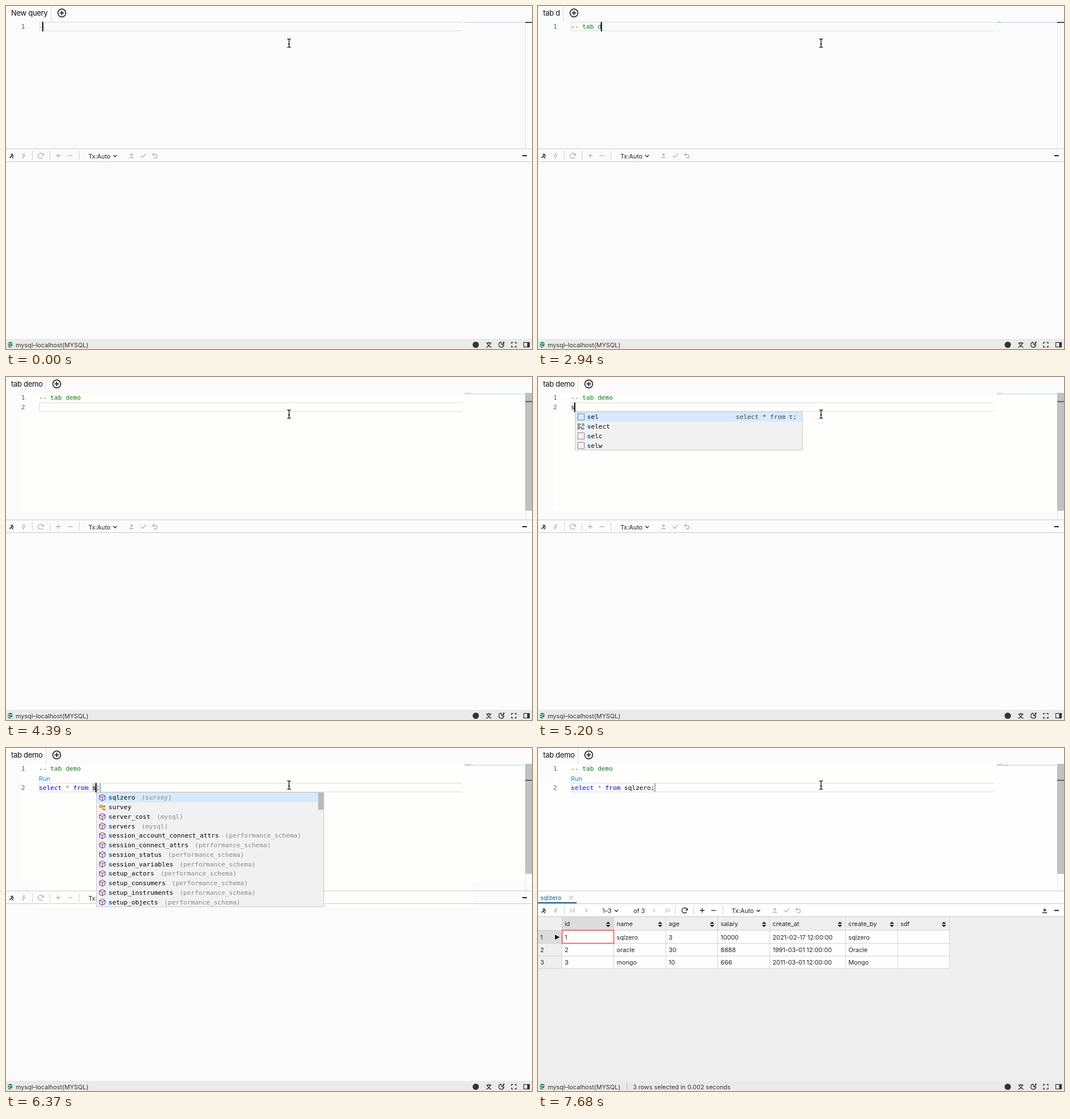
Write an HTML page that moves like this. It is 926 px wide and 605 px high and loops after 8000 ms.

```html
<!DOCTYPE html>
<html lang="en">
<head>
<meta charset="utf-8">
<title>Query editor</title>
<style>
  html, body { margin: 0; width: 100%; height: 100%; overflow: hidden; background: #fbfbfb; }
  svg { display: block; width: 926px; height: 605px; }
  text { font: 10.8px Inter, "Open Sans", sans-serif; fill: #222; white-space: pre; }
  .mono { font: 11.13px "DejaVu Sans Mono", "Liberation Mono", monospace; fill: #000; }
  .title { font-size: 13px; letter-spacing: -.3px; fill: #111; }
  .match { font-weight: bold; fill: #0062bd; }
  .icon { fill: none; stroke-width: 1.3; }
</style>
</head>
<body>
<svg id="stage" viewBox="0 0 926 605"></svg>
<script>
const LOOP = 8000, CH = 6.7, LEFT = 58, ROW = 16.75;
const DARK = '#222', PALE = '#b5b5b5', EDGE = '#cbcbcb';
const stage = document.getElementById('stage');

const snippets = [['sel', 'select * from t;'], ['select'], ['selc'], ['selw']];
const PS = 'performance_schema';
const tables = [
  ['sqlzero', 'survey'], ['survey'], ['server_cost', 'mysql'], ['servers', 'mysql'],
  ...['session_account_connect_attrs', 'session_connect_attrs', 'session_status',
    'session_variables', 'setup_actors', 'setup_consumers', 'setup_instruments',
    'setup_objects'].map(n => [n, PS])
];

// Each step changes part of the state: comment, line 2, caret column, popup, ...
const steps = [
  [0, { note: '-', sql: null, col: 1, caret: 1, lens: 0, paint: 0, list: null, match: 0, stop: 0, mark: 0, done: 0 }],
  [140, { note: '--', col: 2 }],
  [620, { note: '-- ', col: 3 }],
  [1010, { note: '-- t', col: 4 }],
  [1100, { note: '-- ta', col: 5 }],
  [1180, { note: '-- tab', col: 6 }],
  [1660, { caret: 0 }],
  [2020, { note: '-- tab ', col: 7, caret: 1 }],
  [2550, { caret: 0 }],
  [2940, { note: '-- tab d', col: 8, caret: 1 }],
  [3020, { note: '-- tab de', col: 9 }],
  [3110, { note: '-- tab dem', col: 10 }],
  [3290, { note: '-- tab demo', col: 11 }],
  [3770, { sql: '', col: 0 }],
  [3850, { paint: 1 }],
  [4390, { caret: 0 }],
  [4810, { caret: 1 }],
  [5140, { sql: 's', col: 1 }],
  [5200, { list: snippets, match: 1 }],
  [5430, { sql: 'se', col: 2, match: 2 }],
  [5510, { sql: 'sel', col: 3, match: 3 }],
  [5600, { lens: 1 }],
  [6020, { sql: 'select * from t;', col: 15, list: null, paint: 2, stop: 1, mark: 1 }],
  [6110, { list: tables, match: 0 }],
  [6370, { sql: 'select * from s;', match: 1 }],
  [6610, { sql: 'select * from sq;', col: 16, mark: 2, match: 2 }],
  [6700, { list: tables.slice(0, 1) }],
  [7150, { sql: 'select * from sqlzero;', col: 21, list: null, mark: 0 }],
  [7590, { caret: 0, paint: 3 }],
  [7680, { done: 1 }]
];
const states = [];
steps.forEach(([, change], i) => states.push({ ...states[i - 1], ...change }));

const rect = (x, y, w, h, fill, more = '') =>
  `<rect x="${x}" y="${y}" width="${w}" height="${h}" fill="${fill}" ${more}/>`;
const text = (x, y, s, fill = DARK, cls = '') =>
  `<text x="${x}" y="${y}" class="${cls}" style="fill:${fill}">${s}</text>`;
const mono = (x, y, s, fill = '#000') => text(x, y, s, fill, 'mono');
const span = (s, fill) => `<tspan fill="${fill}" style="fill:${fill}">${s}</tspan>`;
const icon = (x, y, d, color = DARK, more = '') =>
  `<path class="icon" transform="translate(${x} ${y})" d="${d}" stroke="${color}" ${more}/>`;

const glyph = {
  plus: 'M-4 0H4M0-4V4',
  minus: 'M-4 0H4',
  flash: 'M1-5L-3 1H0L-1 5L3-1H0Z',
  run: 'M-2-2L1-3L2 0L4 1M1-2L-1 1L2 3V5M-1 1L-2 3H-4',
  refresh: 'M4.5-1A4.6 4.6 0 1 0 3.6 3M5-4V-.6H1.6',
  chevron: 'M-3-1.5L0 1.5L3-1.5',
  check: 'M-4.5 0L-1.5 3L4.5-3.5',
  undo: 'M-1.5-4.5L-4-2L-1.5 .5M-4-2H1A3 3 0 0 1 1 4H-2',
  up: 'M0 2V-3M-2.5-1L0-3.5L2.5-1M-4 3.5H4',
  down: 'M0-4V1M-2.5-1.5L0 1L2.5-1.5M-4 4H4',
  prev: 'M1.5-3L-1.5 0L1.5 3',
  next: 'M-1.5-3L1.5 0L-1.5 3',
  first: 'M-4-3.5V3.5M3-3.5L-.5 0L3 3.5',
  last: 'M4-3.5V3.5M-3-3.5L.5 0L-3 3.5',
  close: 'M-3.5-3.5L3.5 3.5M3.5-3.5L-3.5 3.5',
  cube: 'M0-5.5L5-3V3L0 5.5L-5 3V-3ZM-5-3L0-.5L5-3M0-.5V5.5',
  tree: 'M-5-1L-2-4L0-2L-3 1ZM-1-1H3M1-1V4H3M3-3L5-1L4 0L2-2M3 3L5 4L4 5.5L2 4',
  keyword: 'M-6-4H0M2-4H6M-6-1.3H-2M2-1.3H6M-6 1.4H2M-6 4H-2M0 4H6',
  beam: 'M-3-7.5Q0-7.5 0-5.5Q0-7.5 3-7.5M0-5.5V5.5M-3 7.5Q0 7.5 0 5.5Q0 7.5 3 7.5M-1.5 1.5H1.5',
  lang: 'M-4.5-3H4.5M0-5V-3M-3-3Q-1 3 4.5 4.5M3-3Q1 3-4.5 4.5',
  moon: 'M0-4.5A4.5 4.5 0 1 0 4.5 1A4.2 4.2 0 0 1 0-4.5M2.5-4.5H5L2.5-1.5H5',
  full: 'M-4-1.5V-4H-1.5M1.5-4H4V-1.5M4 1.5V4H1.5M-1.5 4H-4V1.5'
};
const put = (name, x, y, color, more) => icon(x, y, glyph[name], color, more);
const dividers = (xs, y) => xs.map(x => rect(x, y - 8, 1, 16, '#d2d2d2')).join('');

function paint(s) {
  const tint = '#fefefd';
  let out = rect(0, 0, 926, 605, '#fbfbfb');
  if (s.paint) out += rect(27, 28, 899, 208, tint);
  if (s.paint > 1) out += rect(59, 62, 763, 218, tint);
  if (s.paint > 2) out += rect(0, 61, 926, 526, '#fefefe');
  return out;
}

function minimap(s) {
  const specks = (str, y, color) => [...str].map((c, i) =>
    c === ' ' ? '' : rect(808 + i * .93, y, .8, .9, color, 'opacity=".5"')).join('');
  const two = s.sql !== null;
  return rect(807, two ? 29.5 : 28, 107, 1.6, '#cfe4fa') +
    specks(s.note, 28.2, '#008000') + specks(s.sql || '', 30, '#3060a0');
}

function ruler(s) {
  let out = rect(914, 28, 1, 223, '#e4e4e4');
  if (s.paint) out += rect(914, 28, 12, s.lens ? 194 : 208, '#c1c1c1');
  const y = s.lens ? 56 : s.sql !== null ? 42.5 : 28;
  return out + rect(914, y, 12, 1.8, s.paint ? '#555' : '#333');
}

function editor(s) {
  const two = s.sql !== null;
  const top = !two ? 28 : s.lens ? 61.6 : 45;
  let out = `<path d="M803 ${top + .5}H58.5V${top + 15.7}H803" fill="none" stroke="#e3e3e3" stroke-width="1.3"/>`;
  out += mono(26.7, 40, '1', '#237893');
  out += mono(LEFT, 40, s.note, s.note.length > 1 ? '#008000' : '#777');
  if (two) {
    out += mono(26.7, top + 12, '2', '#237893');
    if (s.lens) out += text(LEFT, 58.4, 'Run', '#1482e6');
    if (s.mark) out += rect(LEFT + 14 * CH, top + 1, s.mark * CH, 15, '#ced6e0');
    const body = s.sql
      .replace(/select|from/g, w => span(w, '#0000ff'))
      .replace('*', span('*', '#777'));
    out += mono(LEFT, top + 12, body);
    if (s.stop) out += rect(LEFT + s.sql.length * CH, top + .5, 1, 16, '#48658c');
  }
  if (s.caret) out += rect(LEFT + s.col * CH - (s.col ? 1 : 0), top, 2, 16.7, '#000');
  return out + minimap(s) + ruler(s);
}

function popup(s) {
  if (!s.list) return '';
  const x = Math.round(LEFT + s.col * CH) + .5;
  const y = s.lens ? 79 : 62;
  const h = s.list.length * ROW;
  let out = rect(x, y, 400, h, '#f1f1f1') + rect(x, y, 400, ROW, '#d5eaff');
  s.list.forEach(([name, info], i) => {
    const mid = y + 8.5 + i * ROW, base = mid + 3.9;
    const left = x + 21, snip = s.list === snippets;
    if (snip && i !== 1) out += rect(x + 4.5, mid - 5.5, 11.5, 11, 'none', 'stroke="#555" stroke-dasharray="1.5 .7"');
    else if (snip) out += put('keyword', x + 10, mid, '#444');
    else if (i === 1) out += put('tree', x + 10, mid, '#d67e00');
    else out += put('cube', x + 10, mid, '#652d90', 'style="stroke-width:1"');
    const head = name.slice(0, s.match);
    out += mono(left, base, `<tspan class="match">${head}</tspan>${name.slice(s.match)}`);
    if (!info) return;
    if (snip) out += mono(x + 390 - info.length * CH, base, info, '#444');
    else out += mono(left + name.length * CH + 11, base, `(${info})`, '#8a8a8a');
  });
  if (s.list.length > 11) out += rect(x + 390, y, 10, 30, '#bababa');
  return out + rect(x, y - .5, 400, h + .5, 'none', 'stroke="#c8c8c8"');
}

// Transaction label with its commit and rollback buttons
const transaction = (x, y) => text(x, y + 4.5, 'Tx:Auto') + put('chevron', x + 47, y + .5) +
  put('up', x + 76, y, PALE) + put('check', x + 97, y, PALE) + put('undo', x + 117, y, PALE);
const runners = y => put('run', 10, y) + put('flash', 31, y, PALE, 'style="stroke-width:1"') +
  put('minus', 913, y, DARK, 'style="stroke-width:2"');

function plainBar() {
  const y = 264;
  return rect(0, 251.5, 926, 1, EDGE) + rect(0, 274, 926, 1, EDGE) + runners(y) +
    dividers([46, 77, 128], y) + put('refresh', 61, y, PALE) +
    put('plus', 92, y, PALE) + put('minus', 113, y, PALE) + transaction(145, y);
}

const edges = [42, 133.5, 225, 316.5, 408, 541.5, 633, 724.5];
const heads = ['id', 'name', 'age', 'salary', 'create_at', 'create_by', 'sdf'];
const rows = [
  ['1', 'sqlzero', '3', '10000', '2021-02-17 12:00:00', 'sqlzero', ''],
  ['2', 'oracle', '30', '8888', '1991-03-01 12:00:00', 'Oracle', ''],
  ['3', 'mongo', '10', '666', '2011-03-01 12:00:00', 'Mongo', '']
];

function results() {
  const y = 286.5, line = '#d3d3d3';
  let out = rect(0, 251.5, 926, 1, EDGE) + rect(0, 274, 926, 1, EDGE) +
    text(4, 268, 'sqlzero', '#0b6697') + put('close', 58, 264, '#aaa', 'style="stroke-width:1"') +
    rect(0, 272, 68, 2, '#0b6697') + runners(y) + dividers([46, 241, 273, 325], y) +
    put('first', 62, y, PALE) + put('prev', 85, y, PALE) + text(113, 291, '1–3') +
    put('chevron', 138, 287) + text(168, 290.5, 'of 3') + put('next', 204, y, PALE) +
    put('last', 227, y, PALE) + put('refresh', 258, y) + put('plus', 289, y) +
    put('minus', 309, y) + transaction(341, y) + put('down', 892, y);
  out += rect(0, 297, 926, 290, '#efefef') + rect(0, 297, 926, 1, EDGE);
  out += rect(42, 298, 91.5, 23, '#dcdcdc') + rect(0, 321.5, 42, 23, '#dcdcdc');
  out += rect(42, 321.5, 682.5, 67.5, '#fefefe');
  heads.forEach((name, i) => {
    out += text(edges[i] + 5, 314, name);
    const x = edges[i + 1] - 10;
    out += `<path d="M${x - 4} 310.3h8l-4-4ZM${x - 4} 312h8l-4 4Z" fill="#222"/>`;
  });
  rows.forEach((row, r) => {
    const base = 337.5 + r * 22.4;
    out += text(4, base, r + 1);
    row.forEach((cell, i) => out += text(edges[i] + 5, base, cell));
  });
  edges.forEach(x => out += rect(x - .5, 298, 1, 91, line));
  [321, 344, 366.5, 388.5].forEach(v => out += rect(0, v, 725, 1, line));
  return out + '<path d="M30 329.5V338L38 333.8Z" fill="#111"/>' +
    rect(42.5, 321.5, 91, 23, 'none', 'stroke="#f22" stroke-width="1.2"');
}

function status(s) {
  const y = 597.5;
  let out = rect(0, 587, 926, 18, '#eaeaea') +
    '<path d="M3.5 594Q7.5 591 11.5 594V601Q7.5 604 3.5 601Z" fill="#168a55"/>' +
    icon(7.5, 597, 'M-4-2Q0 .5 4-2M-4 1.5Q-2 3 0 2.5M0 3L2 5L5 1', '#eaeaea') +
    text(17, 601.5, 'mysql–localhost(MYSQL)', '#333');
  if (s.done) out += rect(156, 591, 1, 12, '#bbb') + text(167, 601.5, '3 rows selected in 0.002 seconds', '#333');
  return out + `<circle cx="827" cy="${y}" r="5.5" fill="#333"/>` +
    put('lang', 850, y, '#333') + put('moon', 872, y, '#333') + put('full', 894, y, '#333') +
    rect(911.5, 593.5, 10, 8, 'none', 'stroke="#333" stroke-width="1.2"') + rect(917.5, 593.5, 4, 8, '#333');
}

function draw(s) {
  const title = s.note.slice(3).trim() || 'New query';
  stage.innerHTML = paint(s) + text(9, 17, title, '#111', 'title') + '<g id="add">' +
    rect(0, 0, 1, 28, '#dedede') +
    '<circle cx="19.3" cy="12.3" r="7" fill="none" stroke="#111" stroke-width="1.5"/>' +
    icon(19.3, 12.3, glyph.plus, '#111', 'style="stroke-width:1.6"') + '</g>' +
    editor(s) + (s.done ? results() : plainBar()) + status(s) +
    put('beam', 498.3, 65.5, '#111') + popup(s);
  const width = stage.querySelector('.title').getComputedTextLength();
  document.getElementById('add').setAttribute('transform', `translate(${Math.round(width + 14.3)} 0)`);
}

let shown = -1;
function tick() {
  const t = performance.now() % LOOP;
  let i = steps.length - 1;
  while (steps[i][0] > t) i--;
  if (i !== shown) draw(states[shown = i]);
  requestAnimationFrame(tick);
}
tick();
</script>
</body>
</html>
```
